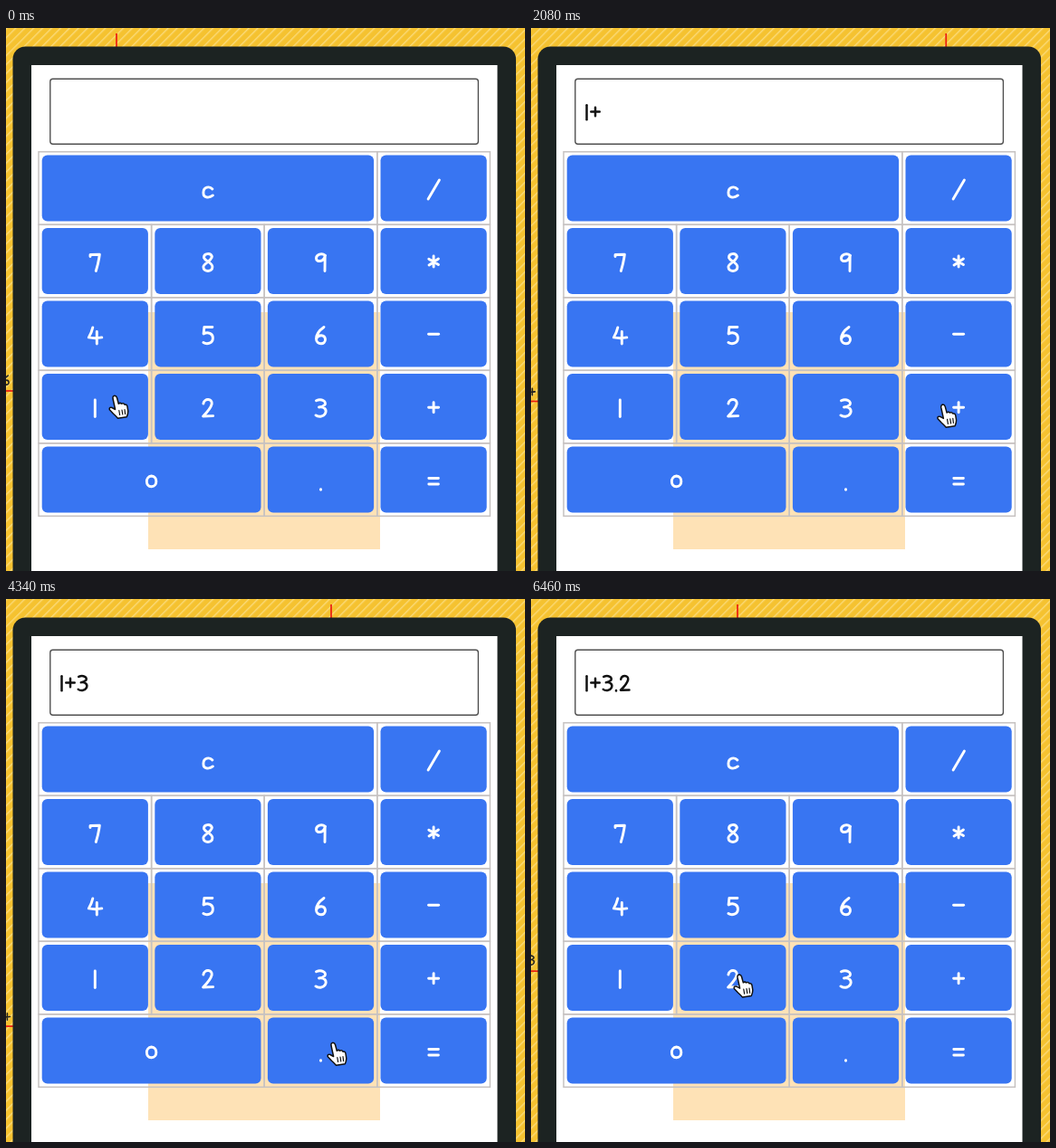
An HTML page for the animation above (6.48 s loop, 573 by 600 pixels).

```html
<!DOCTYPE html>
<html lang="en">
<head>
<meta charset="utf-8">
<title>Calculator</title>
<style>
  html, body { margin: 0; width: 100%; height: 100%; overflow: hidden; background: #f5c431; }
  svg { display: block; width: 573px; height: 600px; }
  text { font: 24px Lato, sans-serif; text-anchor: middle; fill: transparent; }
  .ink { fill: none; stroke-width: 2.9; stroke-linecap: round; stroke-linejoin: round; }
</style>
</head>
<body>
<svg viewBox="0 0 573 600">
  <defs>
    <pattern id="hatch" width="7" height="7" patternUnits="userSpaceOnUse" patternTransform="rotate(45)">
      <rect width="7" height="7" fill="#f5c230"/>
      <rect width="1.4" height="7" fill="#fada78"/>
    </pattern>
  </defs>
  <rect width="573" height="600" fill="url(#hatch)"/>
  <g fill="none" stroke="#ea1a10" stroke-width="1.7">
    <path id="vline" d="M0 6V21"/>
    <path id="hline" d="M0 0H8"/>
  </g>
  <g id="label"></g>
  <rect x="7.5" y="20.5" width="555.5" height="620" rx="14" fill="#1c2322"/>
  <rect x="28" y="41" width="514.5" height="560" fill="#fff"/>
  <rect x="157" y="314" width="256" height="262" fill="#fee2b6"/>
  <rect x="48.8" y="56.3" width="472.6" height="72" rx="3" fill="#fff" stroke="#505050" stroke-width="1.4"/>
  <g id="grid" fill="none" stroke="#c6c2c1" stroke-width="1.5"></g>
  <g id="keys"></g>
  <g id="display"></g>
  <g id="hand" stroke="#111" stroke-width="1.5" stroke-linejoin="round" stroke-linecap="round">
    <path fill="#fff" d="M5 4.5Q4.600 1.500 7 1.200Q8.800 1.200 9.500 3.500L11.300 10.200Q13 8.600 14.600 10.200Q16.800 9 18 11.200Q20.500 10.500 21 13.300L21.800 18.500Q21.800 21.500 20.300 24.800L10.500 26.300Q8 23.500 5.500 21.300L1.300 16.800Q.5 13.700 4 14.500L7.600 16.500Z"/>
    <path fill="none" stroke-width="1.2" d="M11.800 17.500l.8 5M15 17l.8 5M18 16.500l.6 5"/>
  </g>
</svg>
<script>
const LOOP = 6480, LAG = 40;
const $ = id => document.getElementById(id);

// Handwritten strokes, centred on 0,0
const GLYPHS = {
  c: 'M5-.5C2-4-5-3-5 3.500C-5 10 2 9.500 5.500 6.500',
  '/': 'M6.300-10.500L-6 10.500',
  7: 'M-5.300-6.500V-8.500L5-8.700Q4 0 1 9.500',
  8: 'M4.500-6.500C3-11-5-10-4.300-5C-3-1 5 0 5 5C5 11-5 11-5 5C-5 1 4-1 4.500-6.500Z',
  9: 'M5-7.500C1-11-5-8.500-5-4.500C-5 0 3 0 4.700-7L4.500 9.500',
  '*': 'M0-7V5M-5.300-3.800L5.300 2.500M5.300-4L-5 3',
  4: 'M-2.500-8.500Q-4-2-7 2.500Q0 4 7.500 2.500M2-4V9.500',
  5: 'M5-9H-4L-4.800-1.500C0-4 5.500-2 5.500 3C5.500 9-1 10.500-5 8',
  6: 'M3.500-9Q-5-3-5 4C-5 11 5.500 11 5 4.500C4.500-1-3-1-5 4',
  '-': 'M-5.500-1.200H5.500',
  1: 'M0-9V9.500',
  2: 'M-5-5C-4-11 5-11 4.300-4.500Q3 1-5.300 9L5.800 8.700',
  3: 'M-5-8.200C1-11 7-7 4.300-3.500Q2-1.200-2-1C4-2 7 2 5 6C3 10-3 10-5.500 8',
  '+': 'M-5.500-.7H5.500M0-6.200V4.800',
  0: 'M0-5.500C-7-5-7 6.500 0 6.300C7 6 7-5 0-5.500Z',
  '.': 'M0 9.300v.5',
  '=': 'M-5.300-3H5.300M-5.300 3.500H5.300'
};

function glyph(ch, x, y, color, scale = 1) {
  return `<g transform="translate(${x} ${y}) scale(${scale})"><text y="9">${ch}</text>` +
    `<path class="ink" stroke="${color}" d="${GLYPHS[ch]}"/></g>`;
}

// Keypad: rows of [label, column span]
const rows = [
  [['c', 3], ['/', 1]],
  [['7', 1], ['8', 1], ['9', 1], ['*', 1]],
  [['4', 1], ['5', 1], ['6', 1], ['-', 1]],
  [['1', 1], ['2', 1], ['3', 1], ['+', 1]],
  [['0', 2], ['.', 1], ['=', 1]]
];
const COL = 124.6, ROW = 80.5;
let cells = '', keys = '';
rows.forEach((row, r) => {
  let col = 0;
  const y = 136.800 + r * ROW;
  for (const [ch, span] of row) {
    const x = 36 + col * COL, w = span * COL;
    cells += `<rect x="${x}" y="${y}" width="${w}" height="${ROW}"/>`;
    keys += `<rect x="${x + 3.700}" y="${y + 3.700}" width="${w - 7.400}" height="${ROW - 7.400}" rx="6" fill="#3875f2"/>` +
      glyph(ch, x + w / 2, y + ROW / 2 + 1.400, '#fff');
    col += span;
  }
});
$('grid').innerHTML = cells;
$('keys').innerHTML = keys;

// Presses: [time, character, x on the display]
const presses = [
  [480, '1', 61.5], [1840, '+', 71], [2460, '3', 84.5], [4680, '.', 94], [5740, '2', 103.5]
];

// Pointer path: [time, x, y]
const path = [
  [-40, 117, 403.5], [0, 113, 405], [220, 98, 410], [820, 98, 412], [1060, 310, 421],
  [1250, 430, 417], [1560, 452, 415], [1680, 454, 415], [2020, 454, 415], [2400, 361, 413.5],
  [3700, 361, 413.5], [4180, 354, 420], [4340, 354, 489], [4520, 353, 508], [4840, 353, 508],
  [5040, 254, 431], [5300, 223, 413.700], [6480, 223, 413.700]
];

const slope = (i, k) => (path[i + 1][k] - path[i][k]) / (path[i + 1][0] - path[i][0]);
function tangent(i, k) {
  if (i === 0) return slope(0, k);
  if (i === path.length - 1) return 0;
  const a = slope(i - 1, k), b = slope(i, k);
  return a * b > 0 ? 2 * a * b / (a + b) : 0;
}
function at(t, k) {
  let i = 0;
  while (i < path.length - 2 && t >= path[i + 1][0]) i++;
  const h = path[i + 1][0] - path[i][0], u = (t - path[i][0]) / h;
  const s = u * u * (3 - 2 * u);
  return path[i][k] * (1 - s) + path[i + 1][k] * s +
    h * u * (1 - u) * ((1 - u) * tangent(i, k) - u * tangent(i + 1, k));
}

let shownText = null, shownLabel = null;
function draw(t) {
  $('hand').setAttribute('transform', `translate(${at(t, 1)} ${at(t, 2)})`);
  const x = at(t - LAG, 1) + 5, y = at(t - LAG, 2) - 2.5;
  $('vline').setAttribute('transform', `translate(${x} 0)`);
  $('hline').setAttribute('transform', `translate(0 ${y})`);

  const digit = Math.floor(3.2 + (y - 411) * 0.677 + 100) % 10;
  if (digit !== shownLabel) {
    shownLabel = digit;
    $('label').innerHTML = glyph(digit, 0, 0, '#222', 0.55);
  }
  $('label').setAttribute('transform', `translate(0.3 ${y - 12})`);

  const typed = presses.filter(p => p[0] <= t);
  if (typed.length !== shownText) {
    shownText = typed.length;
    $('display').innerHTML = typed.map(([, ch, px]) => glyph(ch, px, 93, '#111', 0.86)).join('');
  }
}

const start = performance.now();
function tick() {
  const t = Math.max(0, performance.now() - start) % LOOP;
  draw(Math.floor(t / 20) * 20);
  requestAnimationFrame(tick);
}
tick();
</script>
</body>
</html>
```
